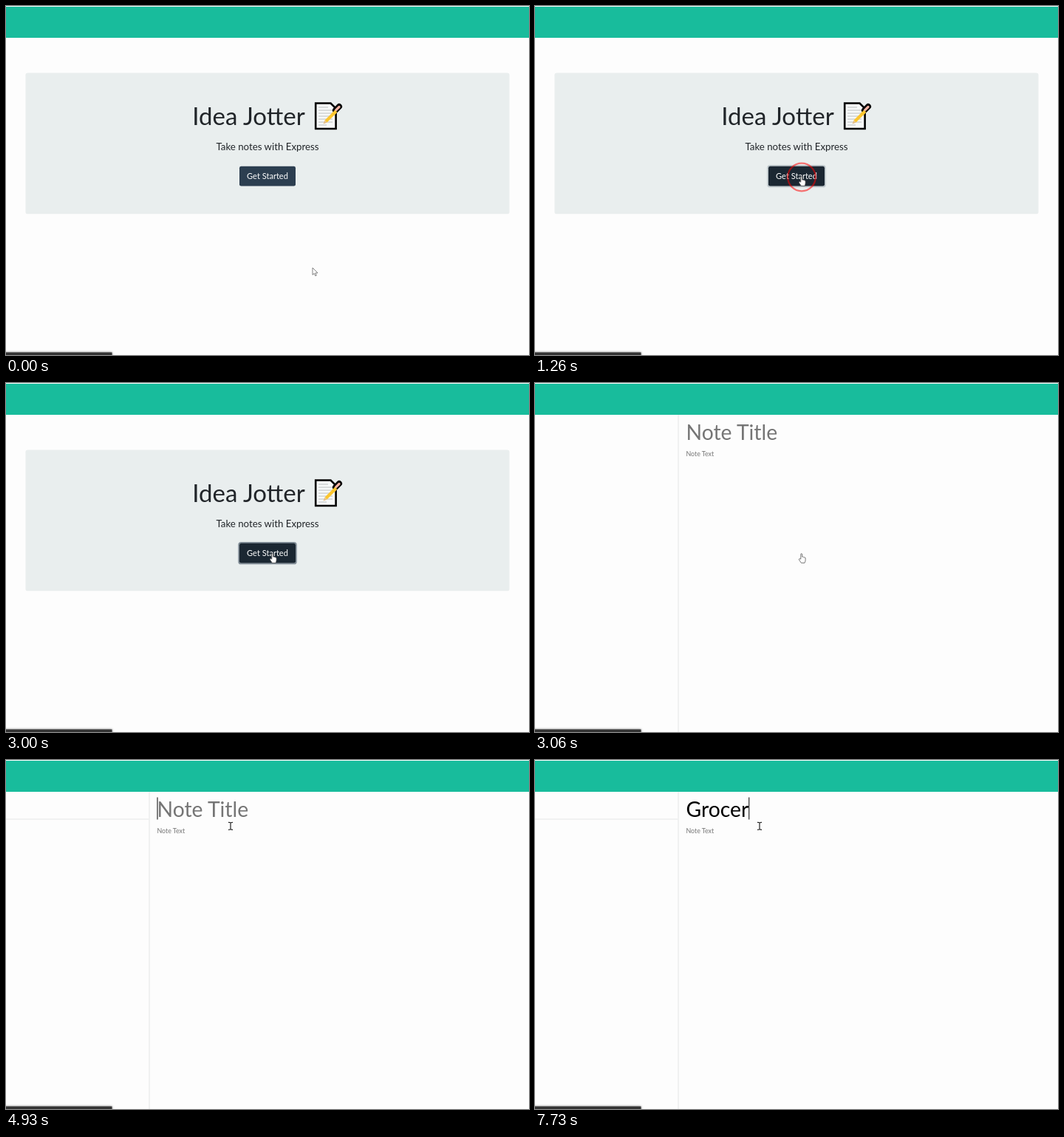
Write an HTML page that moves like this. It is 708 px wide and 472 px high and loops after 8 s.

```html
<!DOCTYPE html>
<html lang="en">
<head>
<meta charset="utf-8">
<title>Notes</title>
<style>
  html, body { margin: 0; width: 100%; height: 100%; overflow: hidden; background: #fdfdfd; }
  svg { display: block; font-family: Lato, sans-serif; }
  .mid { text-anchor: middle; }
  #bar { filter: drop-shadow(0 0 1.5px #0009); }
</style>
</head>
<body>
<svg width="708" height="472" viewBox="0 0 708 472">
  <rect width="708" height="472" fill="#fdfdfd"/>
  <rect y="1" width="708" height="42" fill="#18bc9c"/>

  <g id="home" fill="#212529">
    <rect x="26.5" y="90.5" width="655" height="190.7" rx="2.8" fill="#e9eeee"/>
    <text class="mid" x="328.5" y="160.5" font-size="33.04">Idea Jotter</text>
    <g id="memo" fill="none" stroke="#000">
      <path d="M419.2 131.5H439.5L446.6 138.5V166H419.2Z" fill="#f7f9f9" stroke-width="2.6"/>
      <path d="M423 137H436M423 141H442M423 145H442M423 149H442M423 153H442M423 157H442M423 161H434" stroke="#bcc0c0"/>
      <path d="M429.5 159.5L431.3 154.8 434.3 157.7Z" fill="#e5bd86" stroke="none"/>
      <path d="M433 156L449 140" stroke="#fcc62f" stroke-width="4.2"/>
      <path d="M446 141L451 136" stroke-width="8" stroke-linecap="round"/>
      <path d="M446.3 141.2L451 136.5" stroke="#f5b4a5" stroke-width="3.2" stroke-linecap="round"/>
      <path d="M442.8 146.2L446.8 142.2" stroke="#fcc62f" stroke-width="4.2"/>
    </g>
    <text class="mid" x="354" y="194.5" font-size="13.275">Take notes with Express</text>
    <rect id="focus" x="315.2" y="216" width="77.6" height="28.4" rx="3" fill="none" stroke="#2c3e50" stroke-opacity=".55" stroke-width="1.9"/>
    <rect id="button" x="316" y="216.8" width="76" height="26.8" rx="2.4"/>
    <text class="mid" x="354" y="234" font-size="11.06" fill="#fff">Get Started</text>
  </g>

  <g id="notes">
    <path d="M194 43V472" stroke="#e4e6e6"/>
    <path id="rule" d="M0 80H193" stroke="#e4e6e6"/>
    <text id="title" x="204.5" y="76.5" font-size="28.32"></text>
    <text x="204.5" y="99" font-size="8.85" fill="#757575">Note Text</text>
    <rect id="caret" y="50.5" width="1" height="30"/>
  </g>

  <g id="bar">
    <rect x="-4" y="468.5" width="147.5" height="10" fill="#333"/>
  </g>

  <circle id="ring" r="18.8" fill="none" stroke="#f00" stroke-opacity=".53" stroke-width="2.3"/>
  <g id="pointer" stroke-linejoin="round">
    <path id="arrow" d="M0 0V9.6L2.2 7.6 3.8 11 5.3 10.4 3.8 7H7Z" fill="#fff" stroke="#666" stroke-width=".8"/>
    <path id="hand" d="M-1.2 7.2V.8Q-1.2-.3-.3-.3T.7.8V4.2Q1.6 3.5 2.3 4.5 3.3 4 3.9 5 5.1 4.7 5.1 6V8.6Q5.1 10.3 4 12.3H-.6Q-2.6 9.5-3.6 7.8-3.7 6.6-2.6 6.6Z" fill="#fff" stroke="#555" stroke-width=".8"/>
    <path id="beam" d="M-3-5Q0-5 0-4Q0-5 3-5M0-4.5V4.5M-3 5Q0 5 0 4Q0 5 3 5" fill="none" stroke="#222" stroke-width="1.2"/>
  </g>
</svg>
<script>
const LOOP = 8000, OPEN = 3060, PRESS = 1200, EDIT = 4400, BLINK = 532;
const $ = id => document.getElementById(id);
const show = (id, on) => $(id).setAttribute('visibility', on ? 'visible' : 'hidden');
const clamp = v => Math.min(1, Math.max(0, v));
const within = (v, a, b) => v >= a && v < b;

// pointer stops: time, x, y
const stops = [[30, 415, 354], [890, 300, 231], [1180, 361, 231], [3630, 361, 231],
               [4260, 255, 73], [4440, 255, 73], [4730, 304, 89.3]];
const keys = [6530, 6800, 7260, 7400, 7530, 7730];

function pointerAt(t) {
  let [, x, y] = stops[0];
  for (let i = 1; i < stops.length; i++) {
    const [t0, x0, y0] = stops[i - 1], [t1, x1, y1] = stops[i];
    if (t < t0) break;
    const p = clamp((t - t0) / (t1 - t0)), e = p * p * (3 - 2 * p);
    x = x0 + (x1 - x0) * e;
    y = y0 + (y1 - y0) * e;
  }
  return [x, y];
}

function draw(t) {
  const home = t < OPEN, [x, y] = pointerAt(t);
  $('home').style.display = home ? '' : 'none';
  $('notes').style.display = home ? 'none' : '';

  const over = home && within(x, 316, 392) && within(y, 217, 244);
  $('button').setAttribute('fill', t >= PRESS ? '#1b2732' : over ? '#1e2b37' : '#2c3e50');
  $('focus').setAttribute('opacity', clamp((t - PRESS) / 150));

  const typed = keys.filter(k => t >= k), title = $('title');
  title.textContent = 'Grocer'.slice(0, typed.length) || 'Note Title';
  title.setAttribute('fill', typed.length ? '#000' : '#757575');
  const since = t - (typed.at(-1) ?? EDIT);
  show('caret', !home && since >= 0 && Math.floor(since / BLINK) % 2 === 0);
  $('caret').setAttribute('x', 204.5 + (typed.length && title.getComputedTextLength()));
  show('rule', t >= 3660);

  const hand = over || within(t, OPEN, 3660), beam = t >= 3660;
  show('hand', hand);
  show('beam', beam);
  show('arrow', !hand && !beam);
  $('pointer').setAttribute('transform', `translate(${x} ${y})`);
  show('ring', within(t, PRESS, 1400) || within(t, EDIT, 4480));
  $('ring').setAttribute('transform', `translate(${x} ${y + .5})`);
}

function tick() {
  draw(performance.now() % LOOP);
  requestAnimationFrame(tick);
}
tick();
</script>
</body>
</html>
```
